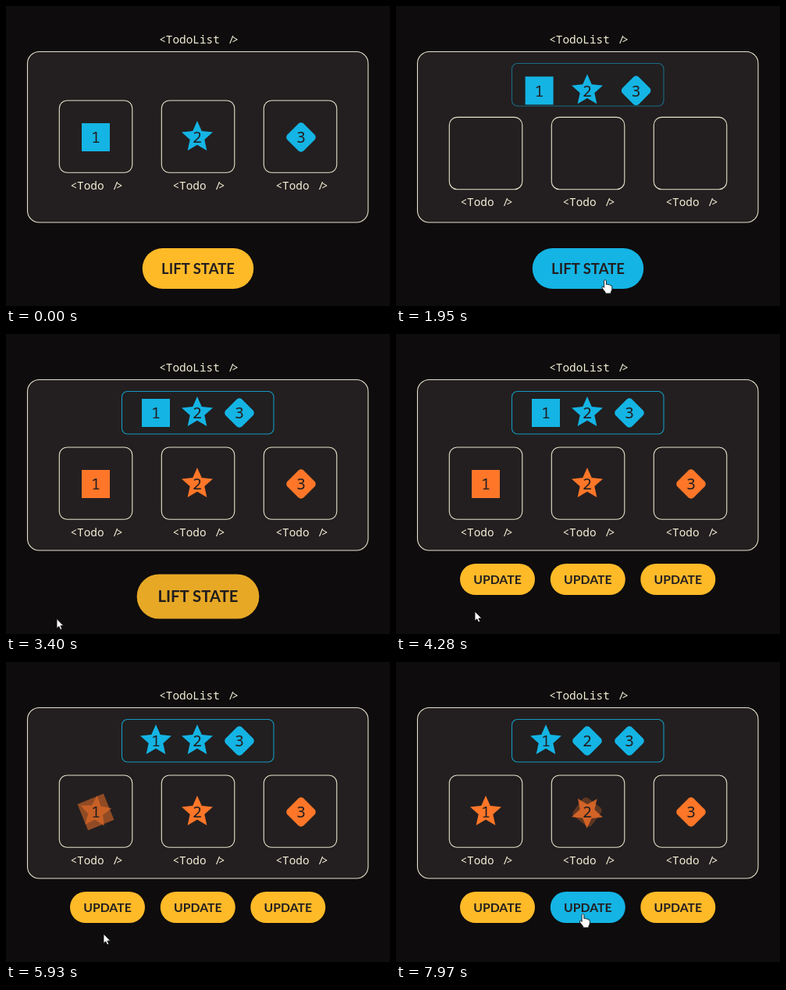
These frames come from a looping animation (492x384 px, 8 s). An HTML page:

```html
<!DOCTYPE html>
<html lang="en">
<head>
<meta charset="utf-8">
<title>Lifting state</title>
<style>
  html, body { margin: 0; width: 100%; height: 100%; overflow: hidden; background: #0e0c0d; }
  svg { display: block; width: 100vw; height: 100vh; }
  text { text-anchor: middle; }
  .label { font: 14.4px "Noto Sans Mono", monospace; fill: #f3eed6; }
  .digit { font: 20px "Noto Sans Mono", monospace; fill: #231f20; }
  .button text { font-family: Lato, sans-serif; font-weight: 700; fill: #231f20; }
  .panel { fill: #231f20; stroke: #e6e4cc; stroke-width: 1.1; }
  .store { fill: #211f20; stroke: #1699c0; stroke-width: 1.1; }
  .cursor path { fill: #fff; stroke: #111; stroke-width: .9; stroke-linejoin: round; }
</style>
</head>
<body>
<svg id="stage" viewBox="0 0 492 384"></svg>
<script>
const LOOP = 8000;
const BLUE = '#14b4e4', ORANGE = '#ff7628', YELLOW = '#ffba28';
const HOME_X = [115, 245, 378], STORE_X = [192, 245, 299];
const HOME_Y = 168, STORE_Y = 101, CARD_DROP = 24;
const stage = document.getElementById('stage');

function add(parent, tag, attrs = {}, text = '') {
  const node = document.createElementNS('http://www.w3.org/2000/svg', tag);
  for (const key in attrs) node.setAttribute(key, attrs[key]);
  if (text) node.textContent = text;
  return parent.appendChild(node);
}
const set = (node, transform, opacity = 1) => {
  node.setAttribute('transform', transform);
  node.setAttribute('opacity', opacity);
};
const mix = (a, b, p) => a + (b - a) * p;
const clamp = p => Math.max(0, Math.min(1, p));
const smooth = p => (1 - Math.cos(Math.PI * clamp(p))) / 2;
const phase = (t, start, length) => smooth((t - start) / length);

// Steps are [time, ...values]; values ease from one step to the next.
function track(steps, t) {
  const next = steps.findIndex(step => step[0] > t);
  if (next === 0) return steps[0].slice(1);
  if (next < 0) return steps[steps.length - 1].slice(1);
  const from = steps[next - 1], to = steps[next];
  const p = phase(t, from[0], to[0] - from[0]);
  return from.slice(1).map((value, i) => mix(value, to[i + 1], p));
}

function label(parent, x, y, name) {
  const node = add(parent, 'text', { x, y, class: 'label' }, `<${name} `);
  add(node, 'tspan', { dx: 2 }, '/');
  add(node, 'tspan', { dx: -4 }, '>');
}

const starPoints = Array.from({ length: 10 }, (_, i) => {
  const r = i % 2 ? 9.8 : 21, a = (i * 36 - 90) * Math.PI / 180;
  return [r * Math.cos(a), r * Math.sin(a)].map(v => v.toFixed(2)).join();
}).join(' ');

const shapes = {
  square: (parent, fill) => add(parent, 'rect', { x: -18, y: -18, width: 36, height: 36, fill }),
  star: (parent, fill) => add(parent, 'polygon', { points: starPoints, fill }),
  diamond: (parent, fill) => add(parent, 'rect',
    { x: -14.75, y: -14.75, width: 29.5, height: 29.5, rx: 5, fill, transform: 'rotate(45)' })
};

const kinds = [['square', 'star'], ['star', 'diamond'], ['diamond']];

function token(index, fill) {
  const root = add(stage, 'g');
  const faces = kinds[index].map(kind => {
    const face = add(root, 'g');
    shapes[kind](face, fill);
    return face;
  });
  add(root, 'text', { y: 7.2, class: 'digit' }, String(index + 1));
  return { root, faces };
}

function morph({ faces: [before, after] }, p) {
  if (!after) return;
  set(before, `rotate(${135 * p})`, 1 - p);
  set(after, `rotate(${135 * (p - 1)})`, p);
}

function button(x, y, w, h, size, text) {
  const root = add(stage, 'g', { class: 'button' });
  const face = add(root, 'rect', { x: -w / 2, y: -h / 2, width: w, height: h, rx: h / 2 });
  add(root, 'text', { y: size * .36, 'font-size': size }, text);
  return { root, face, x, y, w, h };
}

function showButton(b, scale, opacity, cursor) {
  const hot = opacity > .95 && scale > .95 &&
    Math.abs(cursor[0] - b.x) < b.w / 2 && Math.abs(cursor[1] - b.y) < b.h / 2;
  set(b.root, `translate(${b.x} ${b.y}) scale(${scale})`, opacity);
  b.face.setAttribute('fill', hot ? BLUE : YELLOW);
  return hot;
}

label(stage, 247, 47.5, 'TodoList');
add(stage, 'rect', { x: 27.5, y: 58.5, width: 436.5, height: 218.5, rx: 15, class: 'panel' });
const store = add(stage, 'rect', { x: 148.5, y: 73.5, width: 194.5, height: 54.5, rx: 7, class: 'store' });
const cards = add(stage, 'g');
[68, 199, 330].forEach((x, i) => {
  add(cards, 'rect', { x: x + .3, y: 121, width: 93.5, height: 92.3, rx: 10, class: 'panel' });
  label(cards, [116, 247, 379][i], 234.6, 'Todo');
});

const copies = HOME_X.map((_, i) => token(i, ORANGE));
const states = HOME_X.map((_, i) => token(i, BLUE));
const lift = button(246, 336, 142.5, 52, 18.5, 'LIFT STATE');
const updates = [130, 245.8, 361.3].map(x => button(x, 314, 96, 40, 15.8, 'UPDATE'));

const pointer = add(stage, 'g', { class: 'cursor' });
const arrow = add(pointer, 'path', { d: 'M0 0V12.2L2.8 9.8 4.7 14 6.8 13 4.9 9H8.8Z' });
const hand = add(pointer, 'path', {
  d: 'M-1.4 1Q0-1 1.4 1V6Q3 5 4 6.4 5.6 5.6 6.6 7.2 8.6 6.8 8.8 9V12Q8.5 14 7.4 15.5V17.5H.2V16L-4 10.5Q-4.6 8.4-2.8 8.6L-1.4 10Z'
});

const cursorSteps = [
  [150, 310, 388], [600, 286, 366], [1040, 268, 350.5], [2890, 268, 350.5],
  [3400, 65, 364.5], [3800, 68, 363], [4280, 101, 355], [4680, 129, 322],
  [5580, 129, 322], [5930, 125, 348], [6300, 133, 360], [6700, 182, 349],
  [6990, 239.5, 322.5]
];
const liftSteps = [[3200, 1, 1], [3400, 1.1, .9], [3680, 0, 0]];
const updateSteps = [[3680, 0, 0], [3950, 1.06, 1], [4080, 1, 1]];
const morphs = [
  { state: 5030, copy: 5630 },
  { state: 7160, copy: 7761 }
];
const MORPH_TIME = 600;

function render(t) {
  const rise = phase(t, 1397, 705);
  const fall = phase(t, 2210, 700);
  const cursor = track(cursorSteps, t);

  set(cards, `translate(0 ${CARD_DROP * rise})`);
  store.setAttribute('opacity', phase(t, 1650, 520));

  HOME_X.forEach((x, i) => {
    set(states[i].root, `translate(${mix(x, STORE_X[i], rise)} ${mix(HOME_Y, STORE_Y, rise)})`);
    set(copies[i].root,
      `translate(${mix(STORE_X[i], x, fall)} ${mix(STORE_Y, HOME_Y + CARD_DROP, fall)})`,
      clamp(fall * 3));
    const start = morphs[i];
    if (!start) return;
    morph(states[i], phase(t, start.state, MORPH_TIME));
    morph(copies[i], phase(t, start.copy, MORPH_TIME));
  });

  const liftPose = track(liftSteps, t), updatePose = track(updateSteps, t);
  const hot = [showButton(lift, ...liftPose, cursor),
    ...updates.map(b => showButton(b, ...updatePose, cursor))].some(Boolean);

  set(pointer, `translate(${cursor[0]} ${cursor[1]})`, t < 190 ? 0 : 1);
  arrow.setAttribute('opacity', hot ? 0 : 1);
  hand.setAttribute('opacity', hot ? 1 : 0);
}

const begin = performance.now();
function tick() {
  render((performance.now() - begin) % LOOP);
  requestAnimationFrame(tick);
}
render(0);
requestAnimationFrame(tick);
</script>
</body>
</html>
```
